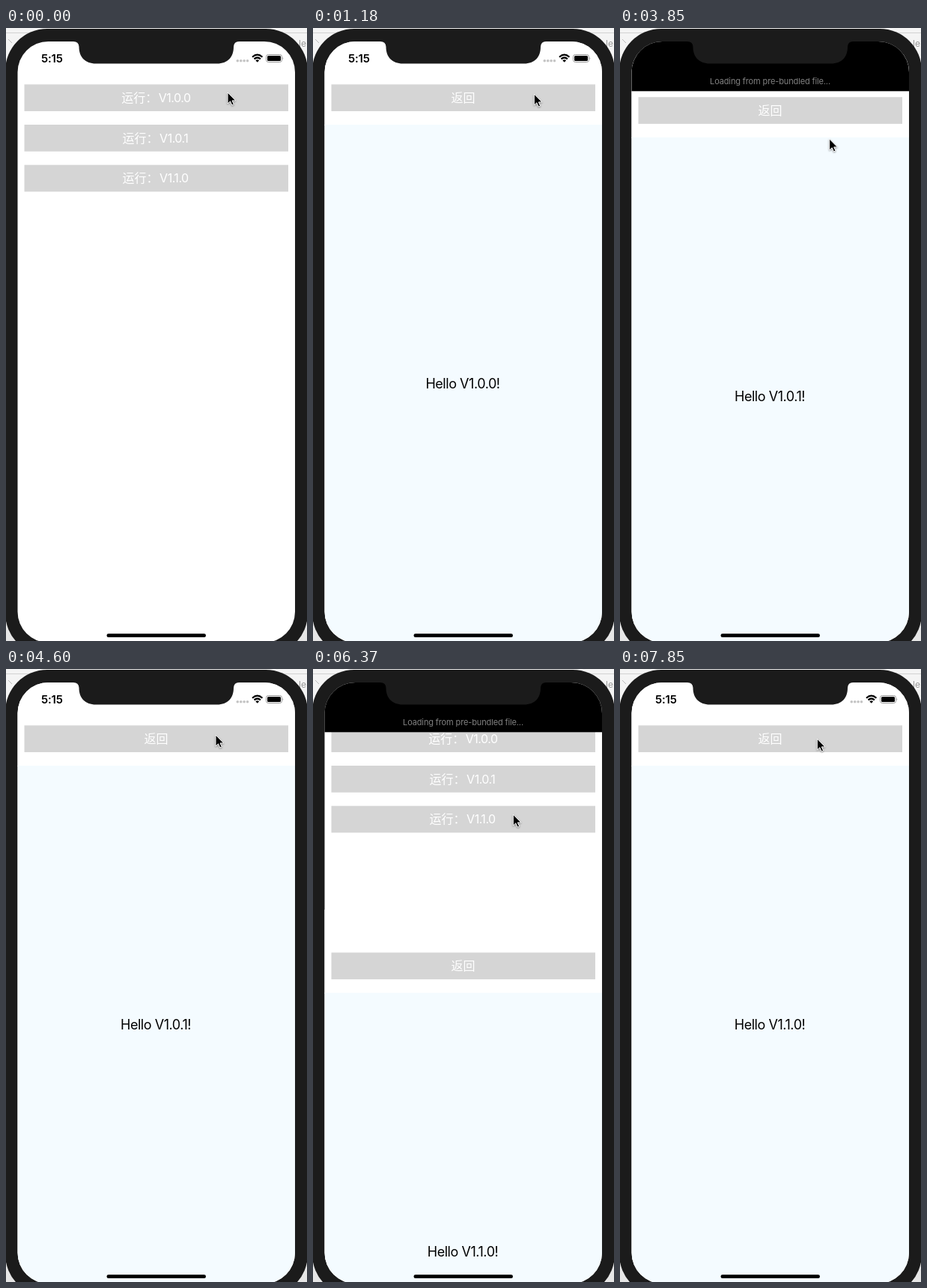
Recreate the animation shown at these times as an HTML page. Size 402 by 818 pixels, loop 8000 ms.

```html
<!DOCTYPE html>
<html lang="zh-CN">
<head>
<meta charset="utf-8">
<style>
html, body { margin: 0; width: 100%; height: 100%; overflow: hidden; background: #f4f4f4; }
svg { display: block; }
text { font-family: Inter, "Noto Sans CJK SC", "Noto Sans CJK", sans-serif; }
.cn { font: 16px "Noto Sans CJK SC", "Noto Sans CJK", sans-serif; fill: #fff; }
.num { font-size: 16px; letter-spacing: -.5px; fill: #fff; }
.bar { fill: #d5d5d5; }
</style>
</head>
<body>
<svg width="402" height="818" viewBox="0 0 402 818">
  <defs>
    <clipPath id="screen"><rect x="15.5" y="18" width="370.5" height="802" rx="41"/></clipPath>
  </defs>

  <!-- desktop behind the phone -->
  <rect width="402" height="818" fill="#f4f4f4"/>
  <path d="M0 6.5H402" stroke="#d2d2d2"/>
  <path d="M3 15L8 20" stroke="#bbb" fill="none"/>
  <text x="391" y="25" font-size="12" fill="#999">le</text>
  <rect y="700" width="402" height="118" fill="#e6e6e6"/>

  <rect x="-1" y="1" width="404" height="836" rx="56" fill="#1b1b1b"/>

  <g clip-path="url(#screen)">
    <rect x="15" y="18" width="372" height="802" fill="#fff"/>
    <g id="home"></g>

    <g id="page">
      <rect x="15" y="18" width="372" height="112" fill="#fff"/>
      <rect x="15" y="129" width="372" height="700" fill="#f4fbff"/>
      <rect class="bar" x="24.5" y="75.3" width="352.5" height="35.7"/>
      <text class="cn" x="184.5" y="99">返回</text>
      <text id="hello" x="200" y="481" font-size="18" letter-spacing="-.45" text-anchor="middle"></text>
    </g>

    <g id="status">
      <text x="47" y="45.5" font-size="15" font-weight="600" letter-spacing="-.2">5:15</text>
      <g fill="#c4c4c4">
        <circle cx="309.3" cy="43.7" r="1.8"/><circle cx="313.7" cy="43.7" r="1.8"/>
        <circle cx="318.1" cy="43.7" r="1.8"/><circle cx="322.5" cy="43.7" r="1.8"/>
      </g>
      <g fill="none" stroke="#000" stroke-width="2.2">
        <path d="M329 38.7Q335.7 32.6 342.4 38.7"/>
        <path d="M331.5 41.4Q335.7 37.6 339.9 41.4"/>
      </g>
      <path d="M333.3 43.3Q335.7 41.3 338.1 43.3L335.7 45.8Z"/>
      <rect x="347.5" y="35.5" width="21" height="10" rx="2.8" fill="none" stroke="#999"/>
      <rect x="349" y="37" width="18" height="7" rx="1.5"/>
      <path d="M369.6 38.8Q371.4 40.5 369.6 42.2Z" fill="#999"/>
    </g>

    <g id="banner">
      <rect x="15" y="18" width="372" height="66.3"/>
      <text x="200.5" y="75" font-size="11" letter-spacing="-.13" text-anchor="middle" fill="#808080">Loading from pre-bundled file...</text>
    </g>
    <rect x="134.5" y="808.3" width="132.5" height="4.7" rx="2.35"/>
  </g>

  <path fill="#1b1b1b" d="M90 17V18Q97 18 97.500 25C97.500 39 106 47.500 120 47.500H282C296 47.500 304 39 304 25Q304.500 18 311 18V17Z"/>

  <path id="cursor" d="M0 0V15L3.500 11.800L5.800 17L8.300 15.900L6 10.900H10.700Z" stroke="#fff" stroke-width="1"
    style="filter:drop-shadow(0 1px 1px #0006)"/>
</svg>
<script>
const $ = id => document.getElementById(id);
const LOOP = 8000, STEP = LOOP / 54, HEIGHT = 802;

$('home').innerHTML = [['V1.0.0', 154.3], ['V1.0.1', 155.6], ['V1.1.0', 155.6]].map(([name, x], i) => {
  const y = 75.3 + i * 53.7;
  return `<rect class="bar" x="24.5" y="${y}" width="352.5" height="35.7"/>
    <text class="cn" x="${x}" y="${y + 23.7}">运行：</text>
    <text class="num" x="${x + 49.5}" y="${y + 23.7}">${name}</text>`;
}).join('');

// each visit: version, time the page opens, time it closes
const visits = [['V1.0.0', 105, 2412], ['V1.0.1', 3522, 5100], ['V1.1.0', 6250, 9000]];

// cursor stops: time, x, y
const stops = [
  [0, 296, 86], [890, 296, 86], [1180, 295.3, 88], [2519, 295.3, 88], [3259, 279.7, 148],
  [3852, 279.7, 148], [4593, 280, 88], [4741, 282.3, 90], [5334, 282.3, 90],
  [6074, 267.3, 194], [6667, 267.3, 194], [7259, 264.5, 124], [7408, 264.5, 124], [7852, 263.3, 93]
];

// remaining distance of a critically damped spring
function spring(ms) {
  const x = Math.max(0, ms) * 0.0175;
  return (1 + x) * Math.exp(-x);
}

function cursorAt(t) {
  const i = stops.findIndex(s => s[0] > t);
  if (i < 0) return stops.at(-1).slice(1);
  const a = stops[i - 1], b = stops[i], k = (t - a[0]) / (b[0] - a[0]);
  return [1, 2].map(n => a[n] + (b[n] - a[n]) * k);
}

function draw(t) {
  const [name, open, close] = visits.findLast(v => t >= v[1]) || visits[0];
  const shift = t < close ? spring(t - open) : 1 - spring(t - close);
  $('page').setAttribute('transform', `translate(0 ${(shift * HEIGHT).toFixed(2)})`);
  $('hello').textContent = `Hello ${name}!`;

  const age = t - open;
  const alpha = age < 0 ? 0 : Math.min(1, Math.max(0, (1010 - age) / 250));
  $('banner').setAttribute('opacity', alpha);
  $('cursor').setAttribute('transform', `translate(${cursorAt(t)})`);
}

const start = performance.now();
function tick() {
  const t = (performance.now() - start) % LOOP;
  draw(Math.min(53, Math.floor((t + 6) / STEP)) * STEP);
  requestAnimationFrame(tick);
}
tick();
</script>
</body>
</html>
```
